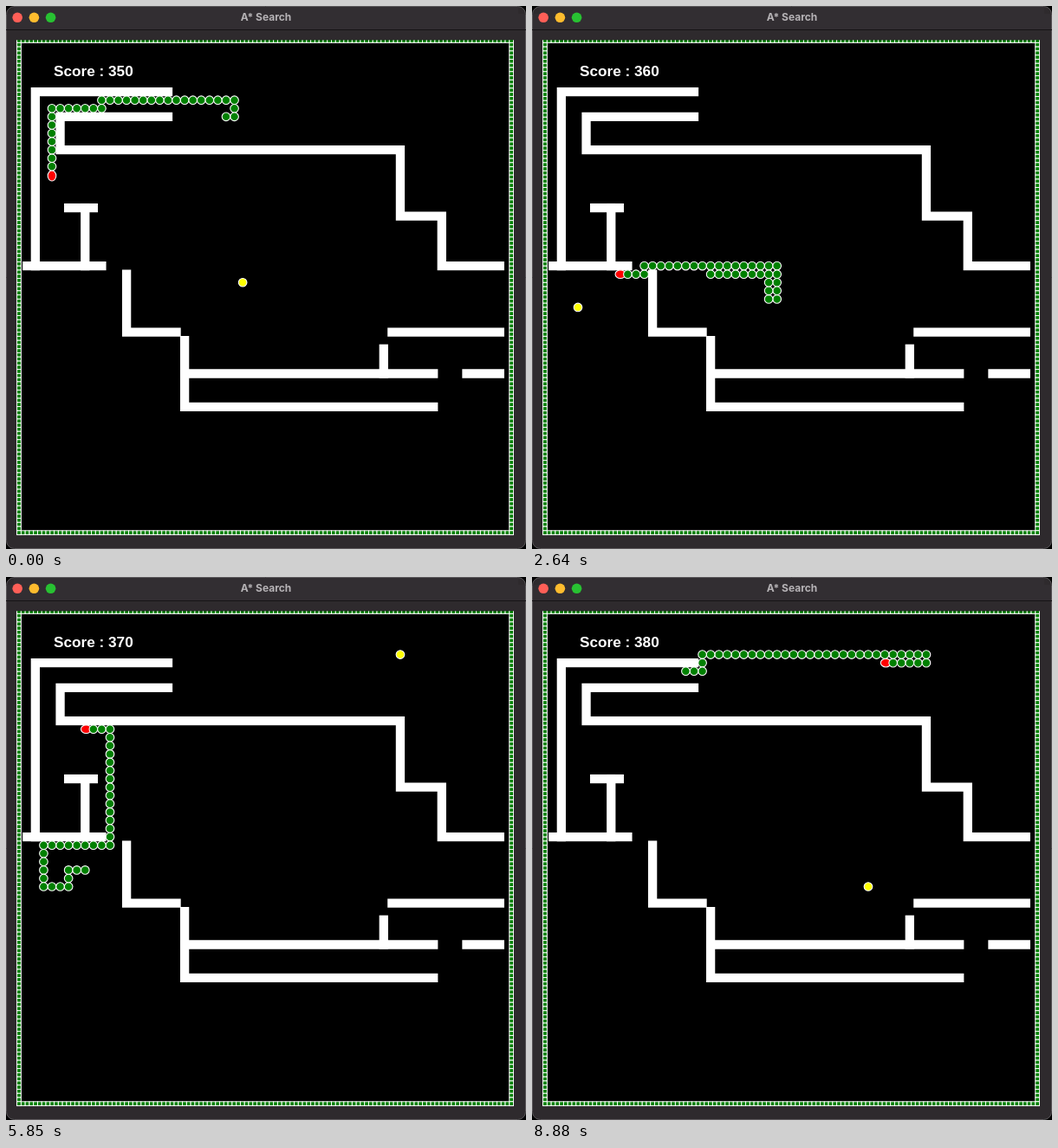
An HTML page with a canvas for the animation above (8.91 s loop, 600 by 627 pixels).

```html
<!DOCTYPE html>
<html lang="en">
<head>
<meta charset="utf-8">
<title>A* Search</title>
<style>
html, body { margin: 0; width: 100%; height: 100%; overflow: hidden; background: #000; }
canvas { display: block; }
h1 {
  position: absolute; top: 0; left: 0; width: 600px; margin: 0; text-align: center;
  font: 700 12px/26px Inter, sans-serif; font-feature-settings: "calt" 0; color: #b6b3b6;
}
</style>
</head>
<body>
<canvas id="stage" width="600" height="627"></canvas>
<h1>A* Search</h1>
<script>
const ctx = document.getElementById('stage').getContext('2d');
const LOOP = 8910, STEP = 42.3, PHASE = 26, CELL = 9.57;
const START_LENGTH = 35, MAX_GROWTH = 3, LATE_GROWTH = 97;
const GREEN = '#008000', WHITE = '#fff';
const X = col => 53 + col * CELL;
const Y = row => 108.7 + row * CELL;

// Follows runs of moves such as "R3D2" cell by cell.
const MOVES = { R: [1, 0], L: [-1, 0], U: [0, -1], D: [0, 1] };
function trace(col, row, runs) {
  const cells = [[col, row]];
  for (const [, dir, count] of runs.matchAll(/([RLUD])(\d+)/g)) {
    for (let i = 0; i < count; i++) {
      col += MOVES[dir][0];
      row += MOVES[dir][1];
      cells.push([col, row]);
    }
  }
  return cells;
}

const path = trace(21, 2, 'R1U2L16D1L6D10R6D8R4D2R13D3R1U4L16D1L8D4R1U3R7D1L2D1R1D1L2U1' +
  'L3D2L3U5R8U14L7U7R15U2R27D1L5');

const walls = [
  trace(14, -1, 'L16D21'), trace(14, 2, 'L13D4R41D8R5D6R7'),
  trace(2, 13, 'R3'), trace(4, 13, 'D7'), trace(-3, 20, 'R9'),
  trace(9, 21, 'D7R6'), trace(16, 29, 'D8R30'), trace(16, 33, 'R30'),
  trace(40, 30, 'D3'), trace(41, 28, 'R13'), trace(50, 33, 'R4')
];

// After a meal the snake stands still while the next route is searched.
const foods = [
  { cell: [23, 22], wait: 0 }, { cell: [0, 25], wait: 345 },
  { cell: [42, -2], wait: 474 }, { cell: [35, 26], wait: 0 }
];
for (const food of foods) {
  const index = path.findIndex(cell => String(cell) === String(food.cell));
  food.step = index < 0 ? Infinity : index - START_LENGTH + 1;
}

function oval(color, x, y, rx, ry = rx, outline = true) {
  ctx.beginPath();
  ctx.ellipse(x, y, rx, ry, 0, 0, 7);
  ctx.fillStyle = color;
  ctx.fill();
  if (!outline) return;
  ctx.strokeStyle = WHITE;
  ctx.lineWidth = 1.1;
  ctx.stroke();
}

function drawWindow() {
  ctx.fillStyle = '#000';
  ctx.fillRect(0, 0, 600, 627);
  ctx.beginPath();
  ctx.roundRect(0.5, 0.5, 599, 626, 9);
  ctx.fillStyle = '#2e2a2d';
  ctx.fill();
  ctx.strokeStyle = '#5b585b';
  ctx.lineWidth = 1;
  ctx.stroke();
  ctx.fillStyle = '#322e32';
  ctx.fillRect(1, 9, 598, 18);
  ctx.fillRect(9, 1, 582, 8);
  ctx.fillStyle = '#151315';
  ctx.fillRect(0, 27, 600, 1);
  ['#ff5f57', '#febc2e', '#28c132'].forEach((color, i) =>
    oval(color, 13.2 + i * 19.2, 13.3, 5.8, 5.8, false));
}

// Small outlined squares along four sides, cut off by the top of the canvas.
function drawBorder() {
  const left = 15, top = 40, span = 568.2, count = 119, size = span / count;
  const stamp = (x, y) => {
    ctx.fillRect(x - size / 2, y - size / 2, size, size);
    ctx.strokeRect(x - size / 2, y - size / 2, size, size);
  };
  ctx.save();
  ctx.beginPath();
  ctx.rect(12, 39.5, 574.2, 572);
  ctx.clip();
  ctx.fillStyle = '#000';
  ctx.fillRect(12, 39, 575, 572);
  ctx.fillStyle = GREEN;
  ctx.strokeStyle = WHITE;
  ctx.lineWidth = 1;
  for (let i = 0; i <= count; i++) {
    const d = i * size;
    stamp(left + d, top);
    stamp(left + d, top + span);
    stamp(left, top + d);
    stamp(left + span, top + d);
  }
  ctx.restore();
}

function drawWalls() {
  ctx.strokeStyle = WHITE;
  ctx.lineWidth = 10.3;
  ctx.lineCap = 'square';
  for (const cells of walls) {
    ctx.beginPath();
    for (const [col, row] of cells) ctx.lineTo(X(col), Y(row));
    ctx.stroke();
  }
}

function stepAt(time) {
  let clock = time + PHASE;
  for (const { step, wait } of foods) {
    const stop = (step + 0.5) * STEP;
    if (clock > stop) clock = Math.max(stop, clock - wait);
  }
  return Math.min(Math.floor(clock / STEP), path.length - START_LENGTH);
}

function drawSnake(step, length) {
  const head = START_LENGTH - 1 + step;
  const [col, row] = path[head];
  if (row === path[head - 1][1]) oval('#f00', X(col) + 1.2, Y(row), 6, 4.8);
  else oval('#f00', X(col), Y(row) + 1.2, 4.8, 6);
  for (const [c, r] of path.slice(head - length + 1, head).reverse()) {
    oval(GREEN, X(c), Y(r), 4.8);
  }
}

function draw(time) {
  const step = stepAt(time);
  const eaten = foods.filter(food => step > food.step).length;
  const growth = Math.min(MAX_GROWTH, eaten + (step > LATE_GROWTH));
  drawWindow();
  drawBorder();
  drawWalls();
  ctx.font = '700 17.2px "Liberation Sans", Arial, sans-serif';
  ctx.fillStyle = WHITE;
  ctx.fillText('Score : ' + (350 + eaten * 10), 55, 81);
  const [col, row] = foods[eaten].cell;
  oval('#ff0', X(col), Y(row), 4.8);
  drawSnake(step, START_LENGTH + growth);
}

const begin = performance.now();
function tick() {
  draw((performance.now() - begin) % LOOP);
  requestAnimationFrame(tick);
}
tick();
</script>
</body>
</html>
```
